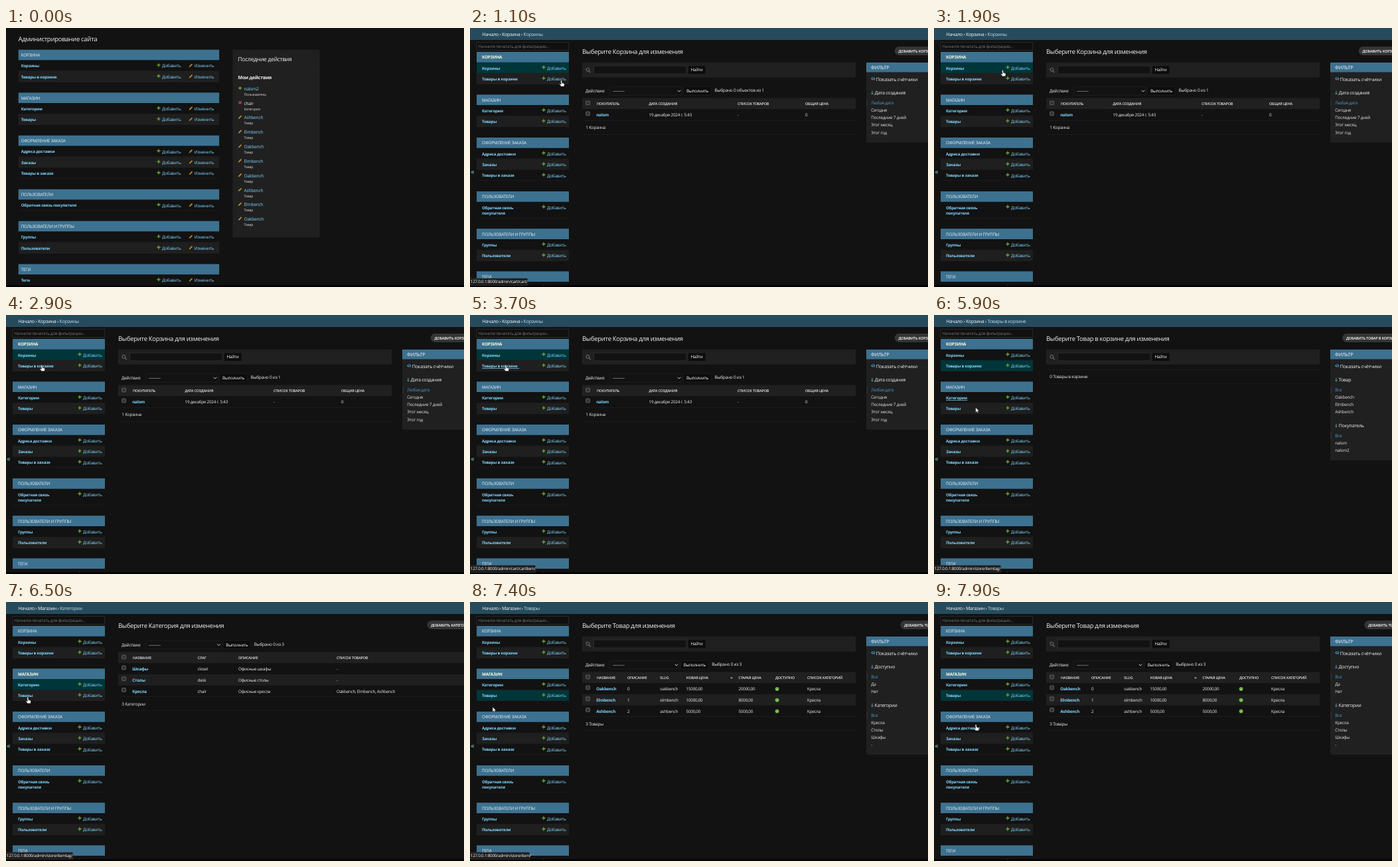
Animation, 690 px wide and 390 px high, one loop 8000 ms. Source, as an HTML page:

```html
<!DOCTYPE html>
<html lang="ru">
<head>
<meta charset="utf-8">
<style>
html, body { margin: 0; width: 100%; height: 100%; overflow: hidden; background: #121212; }
svg { display: block; width: 690px; height: 390px; font-family: "Open Sans", "Noto Sans", sans-serif; }
text { white-space: pre; letter-spacing: -.035em; text-rendering: geometricPrecision; }
</style>
</head>
<body>
<svg id="stage" viewBox="0 0 690 390"></svg>
<script>
const BG = '#121212', PANEL = '#202020', LINE = '#222', HEAD = '#3d7190';
const TEXT = '#f0f0f0', LINK = '#81d4fa', GREEN = '#65a832', GOLD = '#b08a25';
const USER = 'nalom', GOODS = ['Oakbench', 'Elmbench', 'Ashbench'];
const ADMIN = '127.0.0.1:8000/admin/';

const rect = (x, y, w, h, fill, extra = '') =>
  `<rect x="${x}" y="${y}" width="${w}" height="${h}" fill="${fill}" ${extra}/>`;
// Slightly enlarged, tightly spaced lettering, centred on mid.
const text = (x, mid, size, str, fill = TEXT, weight = 500) =>
  `<text x="${x}" y="${mid + size * .38}" font-size="${size * 1.06}" fill="${fill}" font-weight="${weight}">${str}</text>`;
const path = (d, stroke, width = 1) =>
  `<path d="${d}" fill="none" stroke="${stroke}" stroke-width="${width}"/>`;
const rule = (x, y, w) => rect(x, y, w, .6, LINE);
const group = (id, body) => `<g id="${id}">${body}</g>`;

const plus = (x, y) => path(`M${x - 2.6} ${y}h5.2M${x} ${y - 2.6}v5.2`, GREEN, 1.4);
const cross = (x, y) => path(`M${x - 2} ${y - 2}l4 4m0-4l-4 4`, '#cf4045', 1.5);
const pencil = (x, y) => path(`M${x - 1.6} ${y + 1.6}L${x + 2} ${y - 2}`, GOLD, 1.9) +
  `<path d="M${x - 2.8} ${y + 2.8}l.5-2 1.5 1.5z" fill="${GOLD}"/>`;

const MODULES = [
  ['КОРЗИНА', 'Корзины', 'Товары в корзине'],
  ['МАГАЗИН', 'Категории', 'Товары'],
  ['ОФОРМЛЕНИЕ ЗАКАЗА', 'Адреса доставки', 'Заказы', 'Товары в заказе'],
  ['ПОЛЬЗОВАТЕЛИ', 'Обратная связь покупателя'],
  ['ПОЛЬЗОВАТЕЛИ И ГРУППЫ', 'Группы', 'Пользователи'],
  ['ТЕГИ', 'Теги']
];

function modules(x, w, tops, addX, pad, wide, current = []) {
  return MODULES.map(([title, ...rows], m) => {
    let y = tops[m] + 15.9;
    const active = current[0] === m;
    let out = rect(x, tops[m], w, 15.8, HEAD) +
      text(x + pad, tops[m] + 8.1, 6, title, active ? '#ffffdc' : '#f0f5f7', active ? 700 : 400);
    rows.forEach((name, r) => {
      const lines = !wide && name.length > 20 ? ['Обратная связь', 'покупателя'] : [name];
      const h = lines.length > 1 ? 24.6 : 16.4, mid = y + 8.5;
      const fill = active && current[1] === r ? '#00363a' : r % 2 ? '#1f1f1f' : BG;
      out += rect(x, y, w, h, fill) + rule(x, y + h - .6, w);
      lines.forEach((s, i) => out += text(x + pad, mid + i * 8.2, 5.75, s, LINK, 700));
      out += plus(addX, mid - 1.2) + text(addX + 5, mid, 6.1, 'Добавить', LINK);
      if (wide) out += pencil(278.5, mid - .8) + text(283.7, mid, 6.1, 'Изменить', LINK);
      y += h;
    });
    return out;
  }).join('');
}

function dashboard() {
  const order = [2, 1, 0, 1, 0, 2, 1, 0];
  const log = [[USER + '2', 'Пользователь', plus], ['chair', 'Категория', cross],
    ...order.map(i => [GOODS[i], 'Товар', pencil])];
  return rect(0, 0, 690, 390, BG) + text(18.5, 16.2, 9.1, 'Администрирование сайта', TEXT, 400) +
    modules(18.7, 302.5, [32.7, 97.3, 161.8, 242.8, 290.7, 355.5], 230, 4, true) +
    rect(341.5, 32.7, 131, 282.7, PANEL) + text(349.5, 47.1, 8.1, 'Последние действия') +
    rule(349.5, 59, 115) + text(349.5, 74.5, 6.7, 'Мои действия', TEXT, 700) +
    log.map(([name, kind, icon], i) => {
      const y = 91.3 + i * 21.83;
      return icon(352.6, y - .8) + text(358.5, y, 6.3, name, kind === 'Категория' ? TEXT : LINK) +
        text(358.5, y + 8.6, 4.9, kind, '#dadada');
    }).join('');
}

const checkbox = y => rect(174.6, y - 2.9, 5.8, 5.8, '#333', 'rx="1" stroke="#777" stroke-width=".7"');
const button = (x, mid, w, label) =>
  rect(x, mid - 6.3, w, 12.6, '#0c0c0c', 'rx="1.5" stroke="#222" stroke-width=".7"') + text(x + 4, mid, 6, label, '#fff');

function search() {
  return rect(169, 52, 412, 22.5, PANEL) +
    `<circle cx="177.4" cy="62.8" r="2.4" fill="none" stroke="#777"/>` + path('M179.2 64.7l2.3 2.5', '#777', 1.2) +
    rect(186.5, 57, 139.5, 12, BG, 'stroke="#333" stroke-width=".7"') + button(328.5, 63.2, 26.5, 'Найти');
}

function actions(mid, right, counter) {
  return text(174, mid, 6.1, 'Действие:') +
    rect(210.5, mid - 6.4, right - 210.5, 12.8, BG, 'rx="2" stroke="#242424" stroke-width=".7"') +
    text(215, mid, 6.5, '---------') + path(`M${right - 6.5} ${mid - 1}l2.2 2.2 2.2-2.2`, '#ddd', 1) +
    button(right + 2.5, mid, 41, 'Выполнить') + counter(right + 49, mid - .6);
}

// Columns are [x, title]; a cell starting with "*" is a link, "✓" is a status dot.
function table(top, w, cols, rows, footer) {
  const h = 16.75;
  let out = rect(169, top, w, h, PANEL) + checkbox(top + 7.5) +
    cols.map(([x, title]) => text(x, top + 8.6, 5.15, title, '#e8e8e8', 600)).join('');
  rows.forEach((row, r) => {
    const y = top + h * (r + 1), mid = y + 8.7;
    out += rect(169, y, w, h, r % 2 ? '#1f1f1f' : BG) + rule(169, y + h, w) + checkbox(mid - 1.9);
    row.forEach((cell, c) => {
      const x = cols[c][0];
      if (cell === '✓') out += `<circle cx="${x + 2.6}" cy="${mid + .2}" r="3" fill="${GREEN}"/>` +
        path(`M${x + 1.2} ${mid + .2}l1.1 1.2 1.9-2.3`, '#eee', .8);
      else if (cell[0] === '*') out += text(x - .8, mid, 5.95, cell.slice(1), LINK, 700);
      else out += text(x, mid, 5.95, cell);
    });
  });
  const end = top + h * (rows.length + 1);
  return out + text(174.3, end + 10.9, 6.05, footer) + rule(169, end + 21, w);
}

function filter(bottom, ...sections) {
  let out = rect(597, 52, 93, bottom - 52, PANEL) + rect(597, 52, 93, 14.5, HEAD) +
    text(604, 59.4, 6.8, 'ФИЛЬТР', '#f5f8fa') +
    `<ellipse cx="607.4" cy="76.3" rx="2.9" ry="2.1" fill="#3f87ab"/><circle cx="607.4" cy="76.2" r="1.1" fill="${PANEL}"/>` +
    text(611.8, 77.5, 6.8, 'Показать счётчики') + rule(597, 87, 93);
  let y = 97.5;
  for (const [title, ...items] of sections) {
    out += path(`M606 ${y - 2.7}v5m-1.5-1.5l1.5 1.6 1.5-1.6`, '#62a8cc', .9) + text(609.6, y, 6.7, title);
    items.forEach((item, i) => {
      const mid = y + 15 + i * 11.2;
      if (!i) out += rect(597.8, mid - 5, .8, 10, '#2a4250');
      out += text(604.2, mid, 6.05, item, i ? '#e4e4e4' : '#4b9dd0');
    });
    y += 24.2 + items.length * 11.2;
  }
  return out;
}

function page(app, model, crumb, title, buttonX, label, body) {
  const trail = `Начало › ${app ? 'Магазин' : 'Корзина'} › <tspan fill="#c4dce8">${crumb}</tspan>`;
  return rect(0, 0, 690, 390, BG) + rect(0, 0, 690, 18, '#264b5d') + text(18.5, 9.2, 6.7, trail, '#fff') +
    rect(10, 21.4, 138.8, 12, '#101010', 'stroke="#333" stroke-width=".7"') +
    text(12.8, 27.6, 6, 'Начните печатать для фильтрации...', '#777', 400) +
    modules(10, 139, [36, 100.3, 165, 246, 302.2, 366.4], 111, 8, false, [app, model]) +
    text(1.2, 216, 10, '«', LINK) + text(169, 35.4, 9.05, title, TEXT, 400) +
    rect(buttonX, 28, 90, 13, '#353535', 'rx="6.5"') + text(buttonX + 5.7, 34.6, 5.3, label, '#fff', 600) + body;
}

const cartCount = (x, y) => group('longCount', text(x, y, 6.1, 'Выбрано 0 объектов из 1')) +
  group('shortCount', text(x, y, 6.1, 'Выбрано 0 из 1'));
const countOf3 = (x, y) => text(x, y, 6.1, 'Выбрано 0 из 3');

const PAGES = [
  dashboard(),
  page(0, 0, 'Корзины', 'Выберите Корзина для изменения', 639.8, 'ДОБАВИТЬ КОРЗИНА',
    search() + actions(94.7, 319.5, cartCount) +
    table(105.4, 412, [[191, 'ПОКУПАТЕЛЬ'], [269.5, 'ДАТА СОЗДАНИЯ'], [403, 'СПИСОК ТОВАРОВ'], [505, 'ОБЩАЯ ЦЕНА']],
      [['*' + USER, '19 декабря 2024 г. 5:43', '-', '0']], '1 Корзина') +
    filter(172.5, ['Дата создания', 'Любая дата', 'Сегодня', 'Последние 7 дней', 'Этот месяц', 'Этот год'])),
  page(0, 1, 'Товары в корзине', 'Выберите Товар в корзине для изменения', 615.2, 'ДОБАВИТЬ ТОВАР В КОРЗИНЕ',
    search() + rule(169, 82.5, 412) + text(174.3, 93.2, 6.05, '0 Товары в корзине') + rule(169, 103, 412) +
    filter(219, ['Товар', 'Все', ...GOODS], ['Покупатель', 'Все', USER, USER + '2'])),
  page(1, 0, 'Категории', 'Выберите Категория для изменения', 634.5, 'ДОБАВИТЬ КАТЕГОРИЯ',
    actions(64.4, 324.8, countOf3) +
    table(75.4, 521, [[191, 'НАЗВАНИЕ'], [288.5, 'СЛАГ'], [350, 'ОПИСАНИЕ'], [498, 'СПИСОК ТОВАРОВ']],
      [['*Шкафы', 'closet', 'Офисные шкафы', '-'], ['*Столы', 'desk', 'Офисные столы', '-'],
        ['*Кресла', 'chair', 'Офисные кресла', GOODS.join(', ')]], '3 Категории')),
  page(1, 1, 'Товары', 'Выберите Товар для изменения', 648.5, 'ДОБАВИТЬ ТОВАР',
    search() + actions(94.7, 315.3, countOf3) +
    table(105.4, 412, [[191, 'НАЗВАНИЕ'], [237, 'ОПИСАНИЕ'], [286.3, 'SLUG'], [325.5, 'НОВАЯ ЦЕНА'],
      [404.5, 'СТАРАЯ ЦЕНА'], [460, 'ДОСТУПНО'], [508, 'СПИСОК КАТЕГОРИЙ']],
      [['15000,00', '20000,00'], ['10000,00', '8000,00'], ['5000,00', '5000,00']].map((prices, i) =>
        ['*' + GOODS[i], '' + i, GOODS[i].toLowerCase(), ...prices, '✓', 'Кресла']), '3 Товары') +
    '<path d="M391.8 113.4h4.4l-2.2 2.4z" fill="#aaa"/>' +
    filter(230, ['Доступно', 'Все', 'Да', 'Нет'], ['Категории', 'Все', 'Кресла', 'Столы', 'Шкафы', '-']))
];
const PAGE_START = [0, 1000, 3800, 6100, 7300];

// Focused links: from, to, x, y, width
const FOCUS = [[900, 1000, 22.7, 60, 27], [3600, 3800, 18, 80, 56], [5500, 6100, 18, 128.2, 32], [7150, 7300, 18, 144.7, 23]];
// Address hints: from, to, path, width
const HINTS = [[500, 1600, 'cart/cart/', 87], [3000, 4350, 'cart/cartitem/', 99],
  [5500, 6550, 'store/itemtag/', 101], [7100, 7500, 'store/item/', 90]];
// Pointer: time, x, y, shape
const MOVES = [[100, 2, 230, 'arrow'], [550, 38, 57, 'hand'], [940, 40, 57, 'hand'], [1100, 137, 79, 'hand'],
  [1500, 128, 77, 'hand'], [2000, 100, 62, 'arrow'], [2600, 53.3, 75.5, 'hand'], [3800, 53.3, 75.5, 'hand'],
  [4100, 50, 96, 'arrow'], [4450, 44.8, 122.5, 'hand'], [5550, 44.8, 122.5, 'arrow'], [5900, 62.7, 139.3, 'arrow'],
  [6150, 60, 140, 'arrow'], [6450, 32.2, 143.7, 'hand'], [7200, 32.2, 143.7, 'hand'], [7400, 34, 158, 'arrow'],
  [7800, 62.5, 184.7, 'hand'], [8000, 62.5, 184.7, 'hand']];

const HAND = '<path d="M0 0q1-.7 1.4.5l.4 3.3 2.5.7q1 .4.9 1.4l-.4 3.2H.4L-2 6.2q-.6-1 .5-1.1L.3 6-.5.8z" fill="#fff" stroke="#111" stroke-width=".5"/>';
const ARROW = '<path d="M0 0v7.4l1.7-1.5 1.2 2.6 1.2-.5L3 5.4l2.3-.1z" fill="#fff" stroke="#111" stroke-width=".5"/>';

document.getElementById('stage').innerHTML =
  PAGES.map((body, i) => group('page' + i, body)).join('') +
  FOCUS.map(([, , x, y, w], i) => group('focus' + i, rect(x, y, w, .7, LINK))).join('') +
  rect(0, 387.5, 690, 2.5, '#000') +
  HINTS.map(([, , url, w], i) => group('hint' + i,
    `<path d="M0 377H${w - 2}q2 0 2 2v8.5H0z" fill="#1d1d1d" stroke="#3c3c3c" stroke-width=".6"/>` +
    text(.8, 382, 5.9, ADMIN + url, '#fff'))).join('') +
  group('hand', HAND) + group('arrow', ARROW);

const byId = id => document.getElementById(id);
const show = (id, on) => byId(id).style.display = on ? '' : 'none';
const clamp = v => Math.max(0, Math.min(1, v));

function draw(t) {
  PAGE_START.forEach((start, i) => show('page' + i, t >= start && t < (PAGE_START[i + 1] ?? 8000)));
  show('longCount', t < 1200);
  show('shortCount', t >= 1200);
  FOCUS.forEach(([from, to], i) => show('focus' + i, t >= from && t < to));
  HINTS.forEach(([from, to], i) =>
    byId('hint' + i).style.opacity = Math.min(clamp((t - from) / 100), clamp(1 - (t - to) / 250)));

  const next = MOVES.findIndex(m => m[0] > t);
  show('hand', false);
  show('arrow', false);
  if (next < 1) return;
  const a = MOVES[next - 1], b = MOVES[next];
  const u = (t - a[0]) / (b[0] - a[0]), k = u * u * (3 - 2 * u);
  const shape = u < .85 ? a[3] : b[3];
  show(shape, true);
  byId(shape).setAttribute('transform', `translate(${a[1] + (b[1] - a[1]) * k} ${a[2] + (b[2] - a[2]) * k})`);
}

const began = performance.now();
(function tick() {
  draw((performance.now() - began) % 8000);
  requestAnimationFrame(tick);
})();
</script>
</body>
</html>
```
